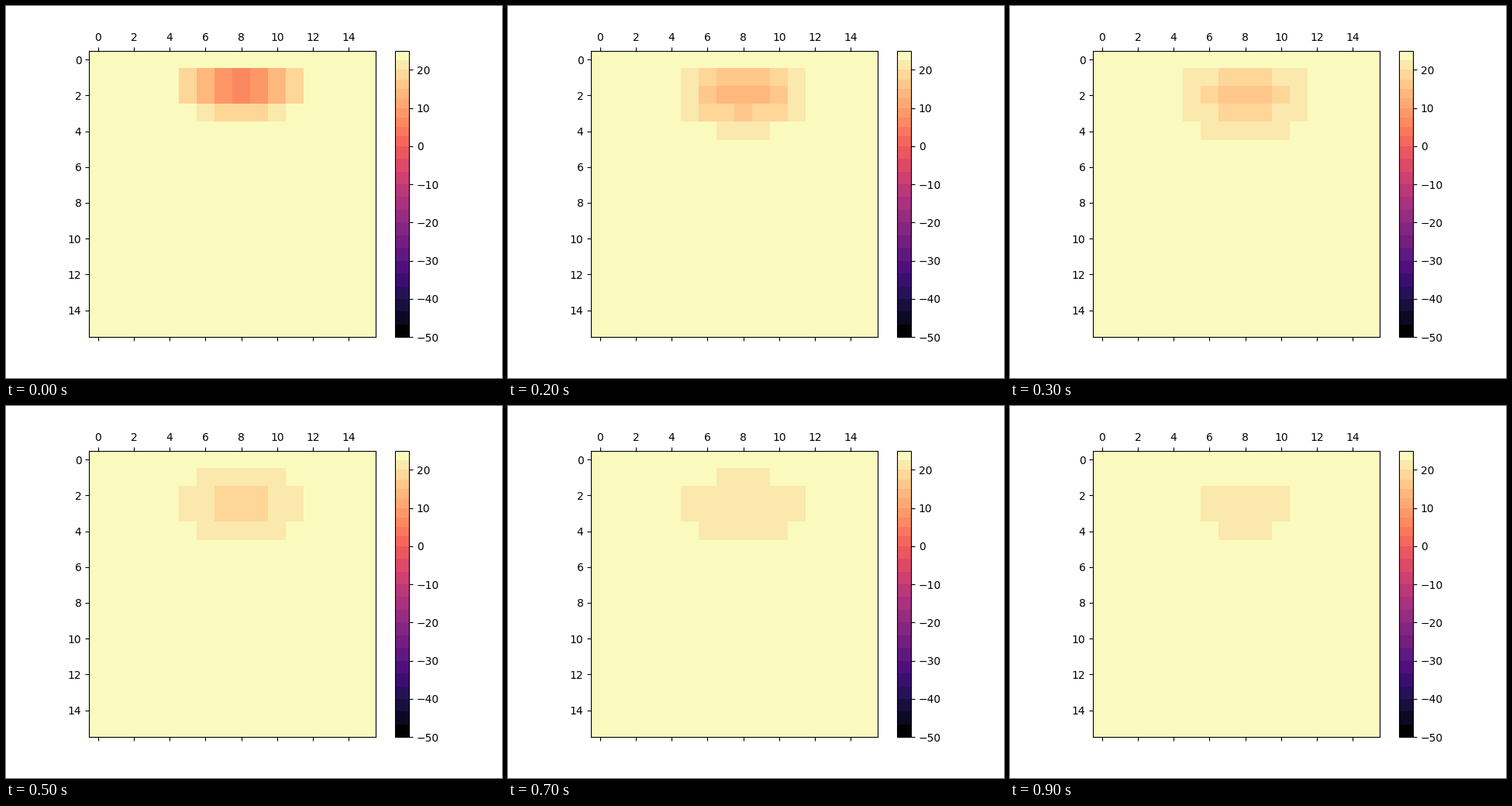
Write a matplotlib script that moves like this. It is 640 px wide and 480 px high and loops after 3000 ms.

```python
import numpy as np
import matplotlib.pyplot as plt
from matplotlib.animation import FuncAnimation
from matplotlib.colors import ListedColormap, to_rgb

GRID = 16
FRAME_MS = 100
FRAMES = 30
LOW, HIGH = -50, 25
BAND = 2.5            # degrees per colour band above zero

# Cold spot: a Gaussian that spreads below a top edge held at HIGH.
DEPTH, COLUMN = 1.5, 8
DROP = 9.03 * BAND
VAR_X, VAR_Y = 3.8, 1.0
SPREAD = 0.62         # variance gained per step
PAUSE, LAST_STEP = 5, 9


def banded_map():
    """Magma in flat bands, coarser below zero."""
    edges = np.concatenate([np.linspace(LOW, 0, 16)[:-1], np.linspace(0, HIGH, 11)])
    centers = (edges[:-1] + edges[1:]) / 2
    colors = plt.get_cmap("magma")((centers - LOW) / (HIGH - LOW))[:, :3]
    colors[0] = to_rgb("black")
    colors[-2] = to_rgb("#fae8ad")
    colors[-1] = to_rgb("#fbfabe")
    samples = np.arange(LOW, HIGH, 0.1) + 0.05
    return ListedColormap(colors[np.digitize(samples, edges) - 1])


def bell(distance, variance):
    return np.exp(-distance ** 2 / (2 * variance))


def temperature(step):
    y, x = np.mgrid[:GRID, :GRID]
    var_x = VAR_X + SPREAD * step
    var_y = VAR_Y + SPREAD * step
    peak = DROP * np.sqrt(VAR_X * VAR_Y / (var_x * var_y))
    # The mirrored bell keeps the top row at HIGH.
    vertical = bell(y - DEPTH, var_y) - bell(y + DEPTH, var_y)
    return HIGH - peak * vertical * bell(x - COLUMN, var_x)


def step_at(frame):
    """One step per frame, held once at PAUSE and for good at LAST_STEP."""
    return PAUSE if frame == PAUSE + 1 else min(frame, LAST_STEP)


fig, ax = plt.subplots(figsize=(6.4, 4.8), dpi=100)
heat = ax.matshow(temperature(0), cmap=banded_map(), vmin=LOW, vmax=HIGH)
fig.colorbar(heat, ax=ax)


def update(frame):
    heat.set_data(temperature(step_at(frame)))
    return [heat]


animation = FuncAnimation(fig, update, frames=FRAMES, interval=FRAME_MS,
                          repeat=True, repeat_delay=0, blit=False)
plt.show()
```
